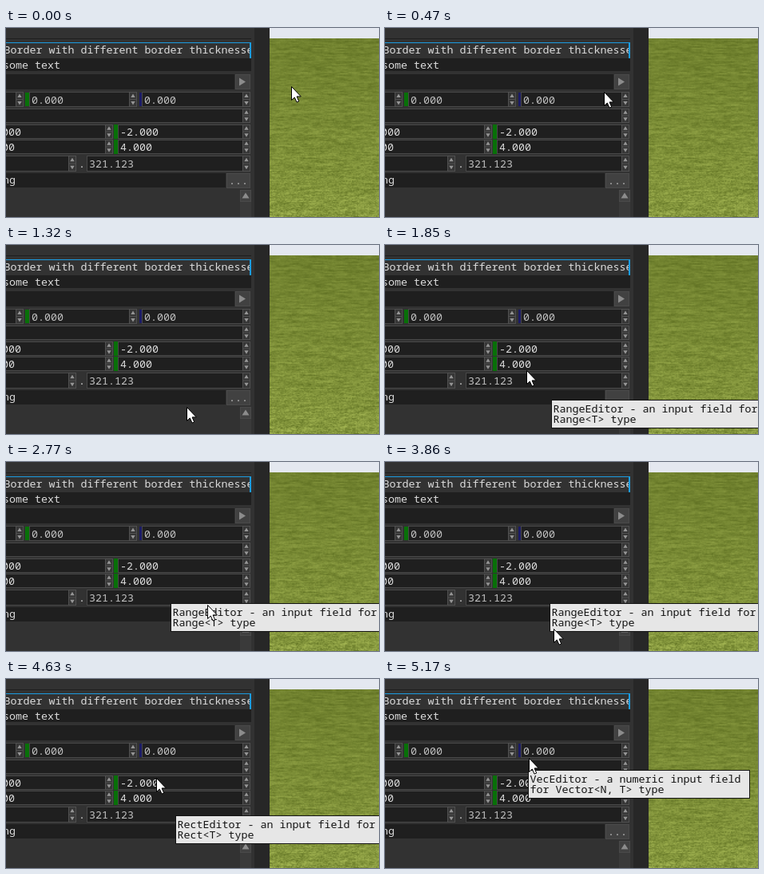
Recreate the animation shown at these times as an HTML page with a canvas. Size 467 by 237 pixels, loop 5.24 s.

```html
<!DOCTYPE html>
<html lang="en">
<head>
<meta charset="utf-8">
<title>Editor tooltips</title>
<style>
html, body { margin: 0; width: 100%; height: 100%; overflow: hidden; background: #323232; }
canvas { display: block; }
</style>
</head>
<body>
<canvas id="stage" width="467" height="237"></canvas>
<script>
const W = 467, H = 237, LOOP = 5240;
const LAST = 67, STEP = 5170 / LAST;
const FONT = '13.33px "Noto Sans Mono", "DejaVu Sans Mono", monospace';
const PANEL = '#323232', FIELD = '#1f1f1f', EDGE = '#484848', BUTTON = '#414141';
const INK = '#dcdcdc', DIM = '#c0c0c0', BLUE = '#1c9ce0';
const ctx = document.getElementById('stage').getContext('2d');

function rect(c, color, x, y, w, h) {
  c.fillStyle = color;
  c.fillRect(x, y, w, h);
}

function box(c, x, y, w, h, fill = FIELD, edge = EDGE) {
  rect(c, edge, x, y, w, h);
  rect(c, fill, x + 1, y + 1, w - 2, h - 2);
}

function label(c, text, x, y, color = INK) {
  c.font = FONT;
  c.fillStyle = color;
  c.fillText(text, x, y);
}

// Arrow head centred on x, y; turn counts quarter turns from pointing up.
function arrow(c, x, y, size, turn, color = '#8c8c8c') {
  c.save();
  c.translate(x, y);
  c.rotate(turn * Math.PI / 2);
  c.beginPath();
  c.moveTo(-size, size * 0.8);
  c.lineTo(0, -size * 0.8);
  c.lineTo(size, size * 0.8);
  c.fillStyle = color;
  c.fill();
  c.restore();
}

function spinner(c, x, y, h) {
  const half = h / 2;
  rect(c, '#505050', x, y, 10, h);
  for (let i = 0; i < 2; i++) {
    rect(c, '#363636', x + 1, y + 1 + i * (half - 0.5), 8, half - 1.5);
    arrow(c, x + 5, y + half * (i + 0.5), 2.7, i * 2, '#969696');
  }
}

// Numeric field from x to x2, spinner included
function numeric(c, x, x2, y, h, text = '', color = INK, tx = x + 3) {
  box(c, x, y, x2 - x, h);
  label(c, text, tx, y + Math.round(h / 2) + 5, color);
  spinner(c, x2 - 10, y, h);
}

function hash(x, y) {
  let n = Math.imul(x, 374761393) ^ Math.imul(y, 668265263);
  n = Math.imul(n ^ (n >>> 13), 1274126177);
  return ((n ^ (n >>> 16)) >>> 0) / 4294967296;
}

// Smooth lattice noise, -0.5..0.5
function noise(x, y) {
  const i = Math.floor(x), j = Math.floor(y);
  const ease = t => t * t * (3 - 2 * t);
  const mix = (a, b, t) => a + (b - a) * t;
  const u = ease(x - i), v = ease(y - j);
  return mix(mix(hash(i, j), hash(i + 1, j), u),
             mix(hash(i, j + 1), hash(i + 1, j + 1), u), v) - 0.5;
}

// Grass: long faint streaks far off, short strong flecks close by
function drawGrass(c) {
  const x0 = 330, y0 = 13;
  rect(c, '#e4e8f0', x0, 0, W - x0, y0);
  const img = c.createImageData(W - x0, H - y0);
  for (let y = 0, k = 0; y < img.height; y++) {
    const near = y / img.height;
    for (let x = 0; x < img.width; x++, k += 4) {
      const d = 20 * noise(x / 15 + 40, y / 1.7)
        + (14 + 14 * near) * noise(x / 5 + 90, y / 1.5)
        + (8 + 32 * near * near) * noise(x / 1.5 + 200, y / 1.2);
      img.data[k] = 110 + 24 * near + d;
      img.data[k + 1] = 127 + 25 * near + d;
      img.data[k + 2] = 45 + 17 * near + d * 0.7;
      img.data[k + 3] = 255;
    }
  }
  c.putImageData(img, x0, y0);
}

function drawPanel(c) {
  rect(c, PANEL, 0, 0, 311, H);
  rect(c, '#272727', 311, 0, 19, H);
  rect(c, '#1e1e1e', 0, 13, 307, 1);

  c.save();
  c.beginPath();
  c.rect(0, 18, 305, 20);
  c.clip();
  label(c, 'Border with different border thicknesse', -2.5, 32);
  c.restore();
  rect(c, BLUE, 0, 18, 307, 1);
  rect(c, BLUE, 305, 18, 2, 20);

  rect(c, FIELD, 0, 38, 307, 16);
  label(c, 'some text', -4, 51);

  rect(c, FIELD, 0, 58, 286, 19);
  box(c, 287, 58, 19, 19, BUTTON, '#4a4a4a');
  arrow(c, 296, 67.5, 5, 1);

  numeric(c, -2, 22, 80, 19);
  numeric(c, 29, 164, 80, 19, '0.000', DIM);
  numeric(c, 170, 306, 80, 19, '0.000', DIM);
  rect(c, '#087008', 24, 81, 5, 17);
  rect(c, '#1c1c66', 167, 81, 3, 17);

  numeric(c, -2, 306, 101, 18);

  ['-2.000', '4.000'].forEach((value, i) => {
    const y = 121 + 19 * i;
    numeric(c, -2, 134, y, 18, '000', INK, -5 - 8 * i);
    numeric(c, 140, 306, y, 18, value);
    rect(c, '#087008', 135, y, 5, 18);
  });

  numeric(c, -2, 88, 160, 20);
  label(c, '.', 91, 175);
  numeric(c, 101, 306, 160, 20, '321.123', DIM);

  rect(c, FIELD, 0, 182, 275, 18);
  label(c, 'ng', -4, 195);
  box(c, 276, 182, 30, 19, BUTTON, '#4a4a4a');
  label(c, '...', 279, 196, DIM);

  rect(c, '#3a3a3a', 293, 203, 14, 34);
  box(c, 293, 203, 14, 15, BUTTON, '#4a4a4a');
  arrow(c, 300, 210, 4.5, 0);
}

const scene = document.createElement('canvas');
scene.width = W;
scene.height = H;
drawGrass(scene.getContext('2d'));
drawPanel(scene.getContext('2d'));

// Pointer path: step, x, y
const PATH = [
  [0, 357, 73], [7, 262, 84], [12, 239, 129], [14, 223, 133], [18, 226, 213],
  [21, 208, 178], [24, 177, 157], [28, 163, 138], [36, 252, 179], [41, 290, 133],
  [49, 233, 205], [50, 211, 209], [53, 212, 155], [56, 206, 118], [60, 188, 124],
  [63, 178, 100], [67, 180, 99]
];

const tip = (from, to, x, y, ...lines) => ({ from, to, x, y, lines });
const RANGE = ['RangeEditor - an input field for', 'Range<T> type'];
const TIPS = [
  tip(9, 14, 256, 117, 'NumericUpDown - a numeric', ' field'),
  tip(21, 26, 208, 194, ...RANGE),
  tip(32, 52, 206, 177, ...RANGE),
  tip(53, 61, 212, 171, 'RectEditor - an input field for', 'Rect<T> type'),
  tip(65, 68, 179, 114, 'VecEditor - a numeric input field', 'for Vector<N, T> type')
];

// Cubic through the path points, flat where a coordinate turns back
function pointerAt(step) {
  let i = 0;
  while (i < PATH.length - 2 && step >= PATH[i + 1][0]) i++;
  const a = PATH[i], b = PATH[i + 1];
  const before = PATH[i - 1] || a, after = PATH[i + 2] || b;
  const span = b[0] - a[0], s = (step - a[0]) / span;
  return [1, 2].map(k => {
    const slope = (p, q, r) =>
      (q[k] - p[k]) * (r[k] - q[k]) <= 0 ? 0 : (r[k] - p[k]) / (r[0] - p[0]) * span;
    const rise = b[k] - a[k], m0 = slope(before, a, b), m1 = slope(a, b, after);
    return Math.round(a[k] + s * (m0 + s * (3 * rise - 2 * m0 - m1 + s * (m0 + m1 - 2 * rise))));
  });
}

function drawTip({ x, y, lines }) {
  box(ctx, x, y, 278, 36, '#e6e6e6', '#141414');
  lines.forEach((line, i) => label(ctx, line, x + 2.5, y + 16 + i * 13, '#141414'));
}

const POINTER = new Path2D('M0 0V17L3.8 13.5 6.5 19.6 9.2 18.5 6.6 12.4H11.8Z');

function drawPointer([x, y]) {
  ctx.save();
  ctx.translate(x + 0.5, y + 0.5);
  ctx.fillStyle = '#fff';
  ctx.strokeStyle = '#000';
  ctx.fill(POINTER);
  ctx.stroke(POINTER);
  ctx.restore();
}

function render(time) {
  const step = Math.min(LAST, Math.floor((time % LOOP + 8) / STEP));
  ctx.drawImage(scene, 0, 0);
  TIPS.filter(t => step >= t.from && step < t.to).forEach(drawTip);
  drawPointer(pointerAt(step));
}

const start = performance.now();
function frame() {
  render(performance.now() - start);
  requestAnimationFrame(frame);
}
frame();
</script>
</body>
</html>
```
